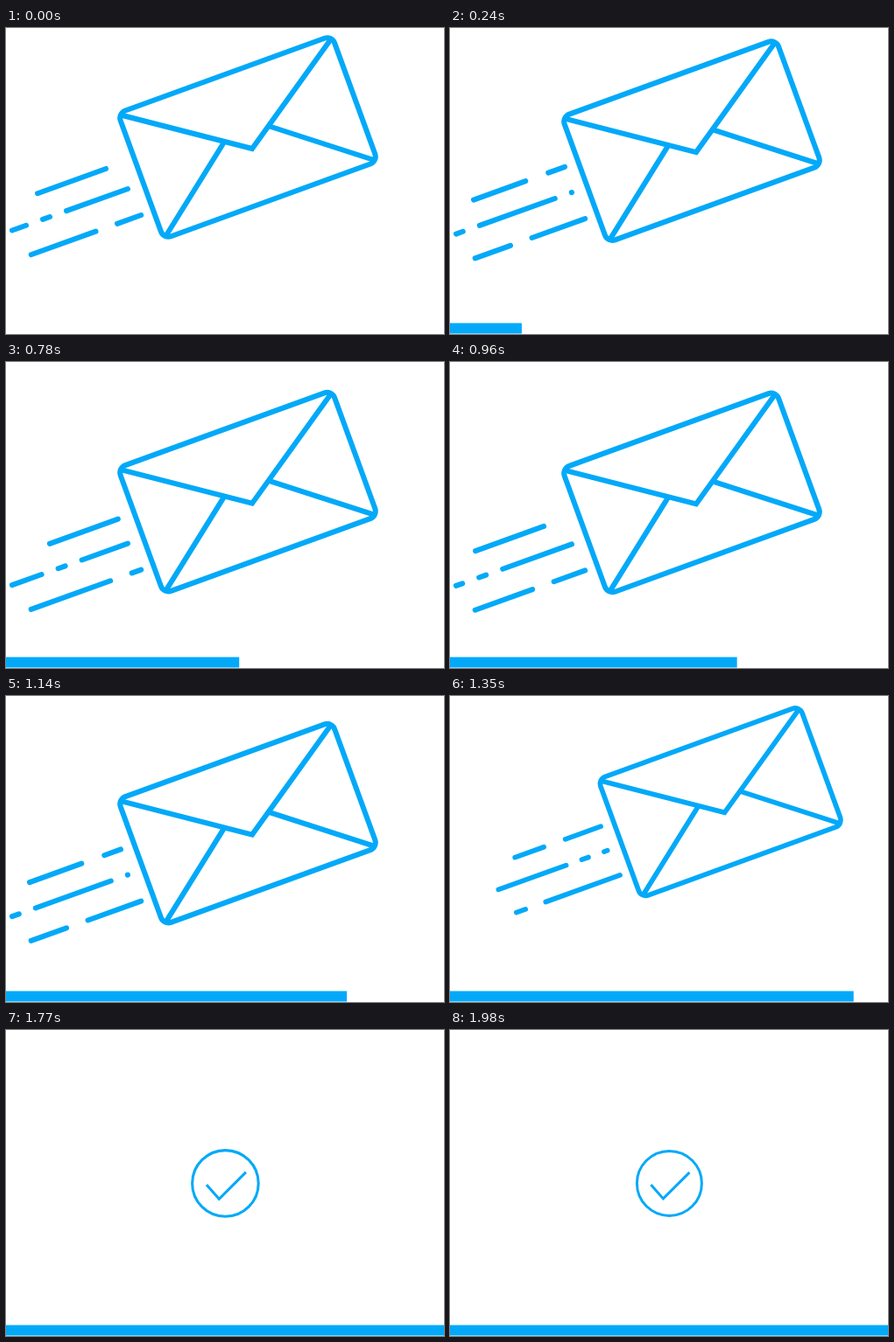
An HTML page for the animation above (2730 ms loop, 500 by 350 pixels).

```html
<!DOCTYPE html>
<html lang="en">
<head>
<meta charset="utf-8">
<title>Sending mail</title>
<style>
  html, body { margin: 0; width: 100%; height: 100%; overflow: hidden; background: #fff; }
  svg { display: block; width: 100vw; height: 100vh; }
  .ink { fill: none; stroke: #03a9f8; }
</style>
</head>
<body>
<svg viewBox="0 0 500 350">
  <g id="mail" class="ink" stroke-width="6">
    <rect x="146" y="48.5" width="260" height="153" rx="9" transform="rotate(-20 276 125)"/>
    <path d="M131 99.5L281 138L370 14M183 237L249 130.5M420 151L299.5 112"/>
    <g id="trails" stroke-linecap="round"></g>
  </g>
  <g id="done" class="ink" stroke-width="3">
    <circle r="37"/>
    <path d="M-21 1.5L-7 17.5L23 -12.5"/>
  </g>
  <rect id="bar" y="337.5" height="12" fill="#03a9f8"/>
</svg>
<script>
const LOOP = 2730, STEP = 30, TRAIL_PERIOD = 900;
const BAR_SPEED = 0.3413;
const EXIT_START = 1220, EXIT_END = 1650;
const POP_START = 1635, POP_TIME = 345;

const byId = id => document.getElementById(id);
const mail = byId('mail'), done = byId('done'), bar = byId('bar');

// Dash lengths and start are measured along x; each pattern fills its line once.
const trails = [
  { from: [27, 192.5], to: [131, 154.8], dashes: [78, 26], start: 9 },
  { from: [7, 231.5], to: [139, 184], dashes: [86, 19, 8, 19], start: 62 },
  { from: [28.7, 259.3], to: [154.2, 214], dashes: [101, 24.5], start: 98.3 }
].map(trail => {
  const span = trail.to[0] - trail.from[0];
  const path = document.createElementNS('http://www.w3.org/2000/svg', 'path');
  path.setAttribute('d', `M${trail.from}L${trail.to}`);
  path.setAttribute('pathLength', span);
  path.setAttribute('stroke-dasharray', trail.dashes.join(' '));
  byId('trails').append(path);
  return { path, span, start: trail.start };
});

function backOut(p) {
  const q = p - 1, s = 1.70158;
  return 1 + q * q * ((s + 1) * q + s);
}

function draw(t) {
  const bob = 12.35 * (1 - Math.cos(2 * Math.PI * t / 1800));
  const exit = 0.33 * (Math.max(0, t - EXIT_START) / 310) ** 2;
  mail.style.display = t < EXIT_END ? '' : 'none';
  mail.setAttribute('transform',
    `translate(${276 + 564 * exit} ${125 - 267.5 * exit}) scale(${Math.max(0, 1 - exit)}) translate(-276 ${bob - 125})`);

  for (const { path, span, start } of trails) {
    path.setAttribute('stroke-dashoffset', span * (t % TRAIL_PERIOD) / TRAIL_PERIOD - start);
  }

  bar.setAttribute('width', Math.min(500, BAR_SPEED * t));

  const pop = Math.min(1, (t - POP_START) / POP_TIME);
  done.style.display = pop > 0 ? '' : 'none';
  if (pop > 0) done.setAttribute('transform', `translate(250.4 175.4) scale(${backOut(pop)})`);
}

const begin = performance.now();
function tick() {
  const t = (performance.now() - begin) % LOOP;
  draw(Math.floor(t / STEP) * STEP);
  requestAnimationFrame(tick);
}
tick();
</script>
</body>
</html>
```
